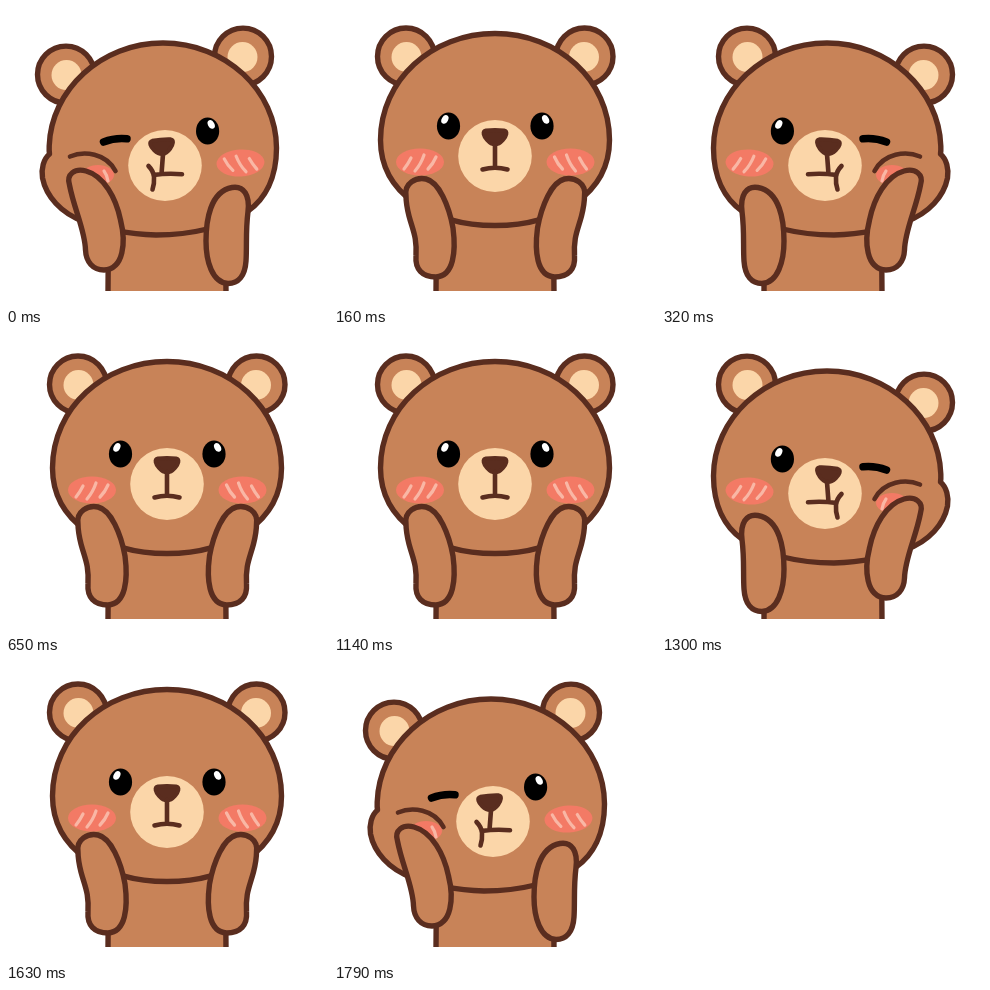
These frames come from a looping animation (322 by 300 pixels, 1.95 s). An HTML page:

```html
<!DOCTYPE html>
<html lang="en">
<head>
<meta charset="utf-8">
<title>Bear squishing its cheeks</title>
<style>
  html, body { margin: 0; width: 100%; height: 100%; overflow: hidden; background: #fff; }
  svg { display: block; width: 322px; height: 300px; }
  .fur { fill: #c88358; stroke: #5a2d1f; stroke-width: 5.4; stroke-linejoin: round; }
  .cream { fill: #fbd6a9; }
  .nose { fill: #5a2d1f; stroke: #5a2d1f; stroke-width: 4; stroke-linejoin: round; }
  .line { fill: none; stroke: #5a2d1f; stroke-width: 4.6; stroke-linecap: round; stroke-linejoin: round; }
  .wink { fill: none; stroke: #000; stroke-width: 7.5; stroke-linecap: round; }
  .blush { fill: #f37a65; }
  .stripe { fill: none; stroke: #f9b7a5; stroke-width: 3.2; stroke-linecap: round; }
  .pose { visibility: hidden; }
</style>
</head>
<body>
<svg viewBox="0 0 322 300">
  <defs>
    <clipPath id="floor"><rect width="322" height="285"/></clipPath>

    <g id="ear">
      <circle class="fur" r="28.5"/>
      <circle class="cream" r="15" cx="0.5" cy="0.5"/>
    </g>
    <g id="eye">
      <ellipse rx="11.6" ry="13.6"/>
      <ellipse rx="3.2" ry="4.6" cx="-3.6" cy="-6.6" fill="#fff" transform="rotate(28 -3.6 -6.6)"/>
    </g>
    <g id="cheek">
      <ellipse class="blush" rx="24" ry="13.5"/>
      <path class="stripe" d="M-16 7Q-12 2 -9 -4M-5 9Q1 2 4 -7M8 7Q13 2 16 -5"/>
    </g>
    <path id="nose" class="nose" d="M-9 -7.5Q0 -8.5 9 -7.5C13 -6.5 11.5 -2 8 2Q4 6.5 0 6.5Q-4 6.5 -8 2C-11.5 -2 -13 -6.5 -9 -7.5Z"/>
    <path id="body" class="fur" d="M103 200H219Q220 250 220 300H102Q102 250 103 200Z"/>

    <g id="restEar"><use href="#ear" x="72" y="50.5"/></g>
    <g id="restSide">
      <use href="#eye" x="114.5" y="120"/>
      <use href="#cheek" x="86" y="156"/>
      <path class="fur" d="M72 190C70 177 82 171 92 173C105 176 115 200 119 222C122 245 120 270 102 271C88 271 81 263 82 250C83 231 79 225 75 210C73 202 72 197 72 190Z"/>
    </g>

    <g id="squish">
      <use href="#body"/>
      <use href="#ear" x="60" y="68.6"/>
      <use href="#ear" transform="translate(237 50.6) scale(-1 1)"/>
      <path class="fur" d="M157 37C220 37 270.5 85 270.5 142C270.5 172 259 193 242 205C221 221 185 229 150 229C121 228 97 223 78 215.5C55 207.5 40 190 36.500 172C35 163 37.500 153 43.500 148Q43 145 43.200 140C45 84 95 37 157 37Z"/>
      <ellipse class="cream" cx="159" cy="159.500" rx="36.800" ry="35.500"/>
      <use href="#nose" transform="translate(156 141.500) rotate(-5)"/>
      <path class="line" d="M157 148L155.500 168M142.500 160Q147.500 165 148 171Q148.500 178 146.500 183.500M147.500 169Q162 167 176 168.300"/>
      <path class="wink" d="M97.500 136Q109 131.500 121 132.800"/>
      <use href="#eye" transform="translate(201.600 125) scale(-1 1)"/>
      <use href="#cheek" transform="translate(234.500 157) rotate(-3) scale(-1 1)"/>
      <ellipse class="blush" cx="92" cy="169" rx="16" ry="10"/>
      <path class="stripe" d="M98 165Q101 169 102 175"/>
      <path class="line" d="M64 150.500C78 144.500 100 147 109.500 165"/>
      <path class="fur" d="M63.500 179C60 168 69 162 80 165C98 170 110 192 114.500 214C120 236 118 263 98 264C87 264 80 256 79.500 244C79 224 68 203 63.500 179Z"/>
      <path class="fur" d="M226 181.500C238 179.500 244 189.500 242 205.500C239.500 225.500 241 240 240 255C239 270.500 232 277.500 222 277.500C206 276.500 200 255 200 235C200 215 204 185.500 226 181.500Z"/>
    </g>
  </defs>

  <g clip-path="url(#floor)">
    <use class="pose" id="left" href="#squish"/>
    <g class="pose" id="rest">
      <use href="#body"/>
      <use href="#restEar"/>
      <use href="#restEar" transform="translate(322.5 0) scale(-1 1)"/>
      <path class="fur" d="M161 27.5C224 27.5 275.5 74 275.5 134C275.5 188 223 219.5 161 219.5C99 219.5 46.5 188 46.5 134C46.5 74 98 27.5 161 27.5Z"/>
      <ellipse class="cream" cx="161" cy="150" rx="36.8" ry="36"/>
      <use href="#nose" x="161" y="132"/>
      <path class="line" d="M161 138V161.5M148.5 163.5Q161 160 173.5 163.5"/>
      <use href="#restSide"/>
      <use href="#restSide" transform="translate(322.5 0) scale(-1 1)"/>
    </g>
    <use class="pose" id="right" href="#squish" transform="translate(322 0) scale(-1 1)"/>
  </g>
</svg>
<script>
  const LOOP = 1950;
  const steps = [
    [0, "left"], [160, "rest"], [320, "right"], [650, "rest"], [810, "left"],
    [1140, "rest"], [1300, "right"], [1630, "rest"], [1790, "left"]
  ];
  const poses = document.querySelectorAll(".pose");
  const start = performance.now();

  function draw(now) {
    const t = Math.max(0, now - start) % LOOP;
    const [, name] = steps.findLast(([at]) => at <= t);
    for (const pose of poses) pose.style.visibility = pose.id === name ? "visible" : "hidden";
    requestAnimationFrame(draw);
  }
  draw(start);
</script>
</body>
</html>
```
